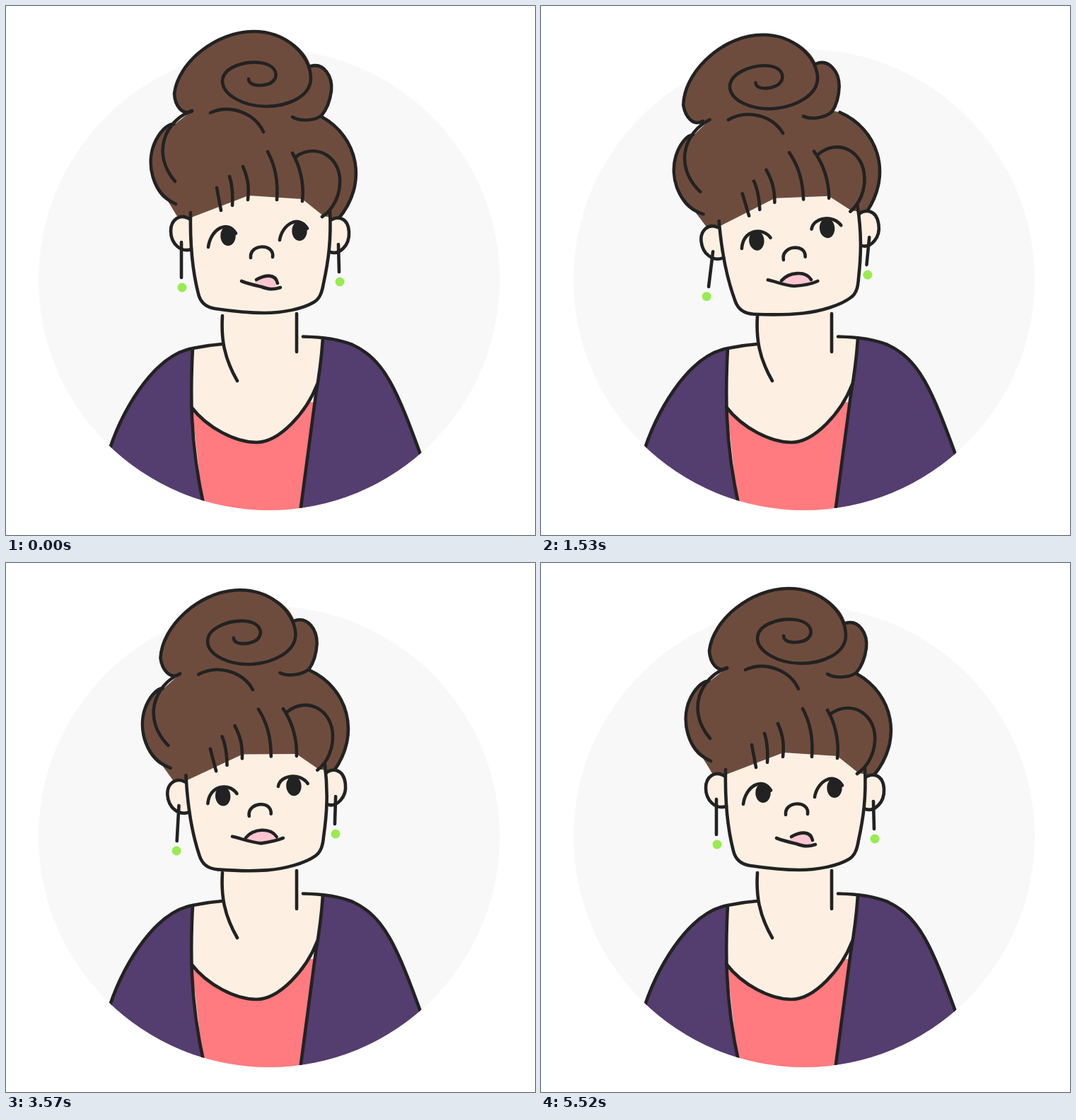
Write an HTML page that moves like this. It is 748 by 748 pixels and loops after 6.48 s.

```html
<!DOCTYPE html>
<html lang="en">
<head>
<meta charset="utf-8">
<title>Portrait</title>
<style>
  html, body { margin: 0; width: 100%; height: 100%; overflow: hidden; background: #fff; }
  svg { display: block; width: 100vw; height: 100vh; }
  .line { fill: none; stroke: #222; stroke-width: 4.6; stroke-linecap: round; stroke-linejoin: round; }
  .skin { fill: #fdf0e3; }
  .hair { fill: #6e4c3d; }
  .coat { fill: #543d6f; }
  .top { fill: #ff7b7f; }
  .lip { fill: #fbc6d0; }
  .bead { fill: #98ec4f; }
  .iris { fill: #222; }
</style>
</head>
<body>
<svg viewBox="0 0 748 748">
  <clipPath id="disc"><circle cx="372" cy="387" r="326"/></clipPath>
  <circle cx="372" cy="387" r="326" fill="#f8f8f8"/>

  <g clip-path="url(#disc)">
    <path class="top" d="M262 560H436L417 720H280Z"/>
    <path class="skin" d="M306 425V478L264 484L262 567C285 597 325 617 354 617C387 617 425 574 440 535L447 470L411 467V425Z"/>
    <path class="coat" d="M143 638C160 580 205 495 264 484C261 540 259 615 280 708V748H100Z"/>
    <path class="coat" d="M448 470C462 470 476 473 490 479C535 500 552 540 590 645V748H415L417 709L438 550C443 522 446 500 448 470Z"/>
    <g class="line">
      <path d="M262 567C285 597 325 617 354 617C387 617 425 574 440 535"/>
      <path d="M143 638C160 580 205 495 264 484C278 481 292 479 306 478"/>
      <path d="M264 484C261 540 259 615 280 708"/>
      <path d="M420 467.5C445 468 468 470 490 479C535 500 552 540 590 645"/>
      <path d="M448 470C446 500 443 522 438 550L416 716"/>
      <path d="M306 438C304 470 308 497 327 530M411 435V489"/>
    </g>
  </g>

  <g id="head">
    <path class="skin" d="M261 285C260 340 265 380 272 407C275 420 283 426 296 428C330 433 350 434 365 434C392 434 420 428 435 419C444 414 447 404 449 392C456 360 460 330 458 285L350 255Z"/>
    <path class="hair" d="M263 148L240 166C228 164 216 180 210 194C200 217 203 262 229 276L243 299L262 299L343 268L419 273L449 297L470 301C515 250 495 185 447 157L350 120Z"/>
    <g id="bun">
      <path class="hair" d="M263 149C249 155 239 141 238 124C243 80 297 36 350 36C392 36 425 60 431 86C450 80 462 100 460 120C458 135 452 148 446 155C435 163 415 163 405 157L340 146Z"/>
      <path class="line" d="M263 149C249 155 239 141 238 124C243 80 297 36 350 36C395 36 431 68 431 103C430 130 395 142 368 142C335 142 306 125 306 106C307 86 338 78 358 80C386 83 387 104 372 110C360 114 343 113 343 103"/>
      <path class="line" d="M431 85C450 80 462 100 460 120C458 135 452 148 446 155C435 163 415 163 405 157"/>
    </g>
    <g class="line">
      <path d="M237 167C228 166 216 180 210 194C198 222 206 265 240 280"/>
      <path d="M263 148C225 162 205 208 239 248"/>
      <path d="M447 157C497 185 513 250 470 301"/>
      <path d="M289 151C318 138 352 152 364 178"/>
      <path d="M405 208C415 225 422 250 419 276M410 213C440 192 475 215 472 252C471 270 462 288 447 298"/>
      <path d="M370 206C380 225 385 245 383 274M335 227C342 243 344 256 342 274"/>
      <path d="M316 241C320 253 321 266 320 282M298 257L304 289"/>
      <path class="skin" d="M259 301C246 293 233 302 233 318C233 336 247 349 262 344"/>
      <path class="skin" d="M459 303C466 297 484 297 485 320C486 340 470 352 459 348"/>
      <path d="M261 292C260 340 265 380 272 407C275 420 283 426 296 428C330 433 350 434 365 434C392 434 420 428 435 419C444 414 447 404 449 392C456 360 460 330 458 290"/>
      <path d="M346 356C344 336 380 335 377 355"/>
    </g>
    <g id="eyes"></g>
    <path id="lip" class="lip"/>
    <path id="mouth" class="line"/>
    <g id="ringL">
      <path class="line" d="M248 334V384"/>
      <circle id="beadL" class="bead" cx="249" cy="398" r="6.5"/>
    </g>
    <g id="ringR">
      <path class="line" d="M470 337L471 376"/>
      <circle id="beadR" class="bead" cx="472" cy="390" r="6.5"/>
    </g>
  </g>
</svg>
<script>
const LOOP = 6480, STEP = 30;
const $ = id => document.getElementById(id);
const set = (el, attrs) => { for (const k in attrs) el.setAttribute(k, attrs[k]); };

const part = (t, a, b) => Math.min(1, Math.max(0, (t - a) / (b - a)));
const smooth = (t, a, b) => (1 - Math.cos(Math.PI * part(t, a, b))) / 2;
const bump = (t, a, b) => Math.sin(Math.PI * part(t, a, b)) ** 2;

// Rises to 1 at the given time, then rings out.
function shake(t, peak) {
  const s = Math.max(0, t - peak);
  return smooth(t, peak - 150, peak) * Math.exp(-s / 130) * Math.cos(2 * Math.PI * s / 300);
}

const add = ([x, y], dx, dy) => [x + dx, y + dy];
const curve = (...points) => `M${points[0]}C${points.slice(1)}`;

function makeEye(x, y, low, sag) {
  const make = name => document.createElementNS("http://www.w3.org/2000/svg", name);
  const group = make("g"), lid = make("path"), iris = make("ellipse");
  set(lid, { class: "line" });
  set(iris, { class: "iris", cy: y, rx: 10.7, ry: 14 });
  group.append(iris, lid);
  $("eyes").append(group);

  // look: 1 right, 0 ahead, -1 left
  return (look, open) => {
    const g = look, far = g * g, base = y + 4;
    set(iris, { cx: x + 8 * g - 5 * far });
    set(lid, { d: curve(
      [x - 22 - 3 * far, y + low + 6 * g + sag * far],
      [x - 18 - 2 * g - 2 * far, y - 17 + 4.5 * g + 4 * far],
      [x + 10 - 5.5 * g - 3 * far, y - 19 - 2 * g - 3 * far],
      [x + 20 - 6 * far, y - 2 - 9.5 * g + 8 * far]
    ) });
    set(group, { transform: `translate(0 ${base * (1 - open)}) scale(1 ${open})` });
  };
}
const eyes = [makeEye(311, 325, 9, 1), makeEye(412, 318, -1, 8)];

// mood: -1 smirk, 0 smile, 1 pout
function drawMouth(k) {
  const q = k * k;
  const left = [321 - 5 * k + 7 * q, 382 + k + 8 * q];
  const dip = [357 + 6.5 * k + 10.5 * q, 394.5 + 2 * k + 4.5 * q];
  const right = [391 + 2.5 * k - q / 2, 391 - 3.5 * k + 3.5 * q];
  const start = [340 - 5.5 * k + 8.5 * q, 385 + 2 * k + 4 * q];
  const end = [382 + k + 3 * q, 388 - 1.5 * k + 2.5 * q];

  const inL = add(dip, -14 - 3 * k, -2.5), inR = add(dip, 10 - 2 * k, 0.5 - 4 * k);
  const outL = add(left, 10 + 5 * k, 3 + k), outR = add(right, -9, 3);
  const lower = curve(left, outL, inL, dip, inR, outR, right);
  const upper = curve(start, add(start, 12, -11 - 4 * k), add(end, -7 - 4 * k, -14), end);
  set($("mouth"), { d: lower + upper });
  set($("lip"), { d: `${upper}L${[outR, inR, dip, inL]}Z` });
}

function draw(t) {
  const back = smooth(t, 3390, 3870), lean = smooth(t, 1290, 1530) - back;
  const drag = bump(t, 3390, 3870), nod = bump(t, 5085, 5520), ring = shake(t, 1530);
  const head = -6 * lean - 6.5 * bump(t, 1290, 1530) + 2.3 * nod;
  const swing = 4.5 * lean + 8.5 * ring + 5 * drag - 2 * nod;
  const sway = Math.sin(2 * Math.PI * t / 1720) * (1 - smooth(t, 3300, 3570)) - 1.5 * ring - drag;

  set($("head"), { transform: `rotate(${head} 372 387)` });
  set($("bun"), { transform: `translate(${-10 * ring - drag} 0)` });
  set($("ringL"), { transform: `rotate(${swing} 248 334)` });
  set($("ringR"), { transform: `rotate(${swing} 470 337)` });
  set($("beadL"), { cx: 249 + sway });
  set($("beadR"), { cx: 472 - sway });

  const look = 1 - smooth(t, 300, 660) - smooth(t, 3570, 3870) + 2 * smooth(t, 5085, 5400);
  const open = 1 - 0.88 * bump(t, 2220, 2430);
  eyes.forEach(eye => eye(look, open));
  drawMouth(smooth(t, 1200, 1500) + back - 2 * smooth(t, 5085, 5490) - 1);
}

function frame() {
  const t = performance.now() % LOOP;
  draw(Math.floor(t / STEP) * STEP);
  requestAnimationFrame(frame);
}
frame();
</script>
</body>
</html>
```
